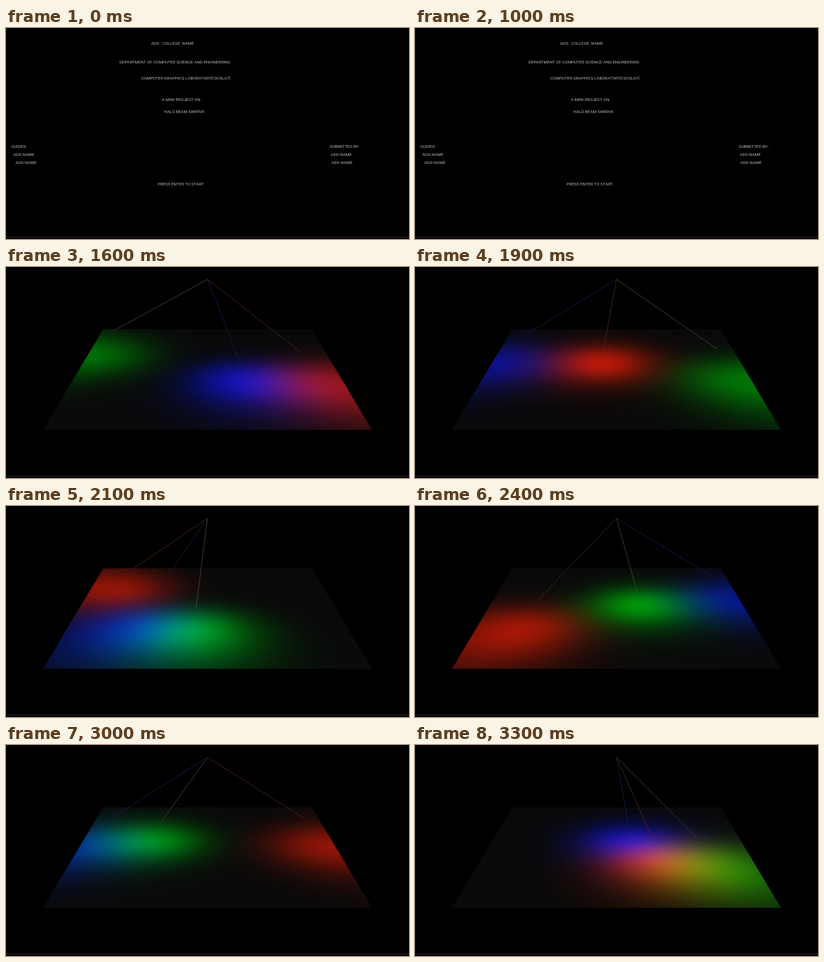
Recreate the animation shown at these times as an HTML page with a canvas. Size 600x315 px, loop 3.4 s.

```html
<!DOCTYPE html>
<html lang="en">
<head>
<meta charset="utf-8">
<title>Swinging lights</title>
<style>
  html, body { margin: 0; width: 100%; height: 100%; overflow: hidden; background: #000; }
  canvas { display: block; }
</style>
</head>
<body>
<canvas id="stage" width="600" height="315"></canvas>
<script>
const ctx = document.getElementById('stage').getContext('2d');
const LOOP = 3400, SCENE_START = 1200;
const CX = 300, CY = 151.2, HALF_W = 300, HALF_H = 159;
const TILT = Math.SQRT1_2;            // camera looks down at 45 degrees
const LAMP_Y = 1.25, PLANE = 0.95, GAIN = 220;

const titles = [
  ['ADD   COLLEGE  NAME', 216, 25.2],
  ['DEPARTMENT OF COMPUTER SCIENCE AND ENGINEERING', 169, 52.8],
  ['COMPUTER GRAPHICS LABORATORY[10CSL67]', 201.2, 77.2],
  ['A MINI PROJECT ON', 232, 108.6],
  ['HALO BEAM SWERVE', 235.5, 127],
  ['GUIDES:', 8, 179.2],
  ['ADD NAME', 11, 191],
  ['ADD NAME', 14, 202.5],
  ['SUBMITTED BY:', 482, 179.2],
  ['ADD NAME', 483.5, 191],
  ['ADD NAME', 484.5, 202.5],
  ['PRESS ENTER TO START', 225.8, 235]
];

// Swing periods in steps; order is red, green, blue.
const lamps = [
  { periodX: 70, periodZ: 140, line: 'rgb(80,34,36)' },
  { periodX: 120, periodZ: 60, line: 'rgb(64,72,58)' },
  { periodX: 50, periodZ: 100, line: 'rgb(30,24,80)' }
];

// [time, swing step]: the pace varies a little.
const pace = [[1200, 8], [1600, 45], [2100, 91], [2600, 142], [3000, 175], [3300, 202]];

function stepAt(time) {
  const i = Math.max(1, pace.findIndex(([t]) => t >= time));
  const [t0, n0] = pace[i - 1], [t1, n1] = pace[i];
  return Math.round(n0 + (n1 - n0) * (time - t0) / (t1 - t0));
}

function aim(lamp, step) {
  const swing = (degrees, period) =>
    degrees * Math.PI / 180 * Math.sin(2 * Math.PI * step / period);
  const a = swing(20, lamp.periodX), b = swing(40, lamp.periodZ);
  return [Math.sin(b), -Math.cos(b) * Math.cos(a), -Math.cos(b) * Math.sin(a)];
}

function project(x, y, z) {
  const depth = 3 - TILT * (y + z);
  return [CX + HALF_W * 2 * x / depth, CY - HALF_H * 2 * TILT * (y - z) / depth];
}

function drawFloor(aims) {
  const left = 50, top = 90, width = 500, height = 158;
  const image = ctx.createImageData(width, height);
  const light = [0, 0, 0];
  for (let row = 0; row < height; row++) {
    const ny = (CY - top - row - 0.5) / HALF_H;
    const w = 3 * ny / (ny - 2), z = w / TILT;
    if (Math.abs(z) > PLANE) continue;
    for (let col = 0; col < width; col++) {
      const x = (left + col + 0.5 - CX) / HALF_W * (3 - w) / 2;
      if (Math.abs(x) > PLANE) continue;
      const dist = Math.hypot(x, LAMP_Y, z);
      const diffuse = LAMP_Y / dist;
      const toEye = TILT * (LAMP_Y - z) / dist;
      const shine = ((diffuse + TILT) / Math.sqrt(2 + 2 * toEye)) ** 10;
      const lit = 0.04 + 0.64 * diffuse + 0.16 * shine;
      aims.forEach(([dx, dy, dz], i) => {
        const facing = (x * dx - LAMP_Y * dy + z * dz) / dist;
        light[i] = GAIN * (0.04 + (facing > 0.5 ? lit * facing ** 20 : 0));
      });
      const [r, g, b] = light, p = (row * width + col) * 4;
      // Video colour shift: richer red, duller green.
      image.data[p] = 1.087 * r - 0.073 * g - 0.014 * b;
      image.data[p + 1] = 0.097 * r + 0.845 * g + 0.058 * b;
      image.data[p + 2] = -0.014 * r - 0.026 * g + 1.04 * b;
      image.data[p + 3] = 255;
    }
  }
  ctx.putImageData(image, left, top);
}

function drawScene(step) {
  const aims = lamps.map(lamp => aim(lamp, step));
  drawFloor(aims);
  ctx.lineWidth = 0.9;
  lamps.forEach((lamp, i) => {
    const [dx, dy, dz] = aims[i];
    ctx.strokeStyle = lamp.line;
    ctx.beginPath();
    ctx.moveTo(...project(0, LAMP_Y, 0));
    ctx.lineTo(...project(dx, LAMP_Y + dy, dz));
    ctx.stroke();
  });
}

function drawTitles() {
  ctx.font = '6.22px Roboto, sans-serif';
  ctx.fillStyle = '#b8b8b8';
  for (const [text, x, y] of titles) ctx.fillText(text, x, y);
}

function draw(time) {
  ctx.fillStyle = '#000';
  ctx.fillRect(0, 0, 600, 315);
  if (time < SCENE_START) drawTitles();
  else drawScene(stepAt(time));
  ctx.fillStyle = 'rgb(42,32,36)';
  ctx.fillRect(0, 311.4, 600, 1.2);
  ctx.fillStyle = 'rgb(14,12,12)';
  ctx.fillRect(0, 0, 1, 311);
}

let shown = -1;
function tick() {
  const time = Math.floor(performance.now() % LOOP / 100) * 100;
  if (time !== shown) draw(shown = time);
  requestAnimationFrame(tick);
}
tick();
</script>
</body>
</html>
```
